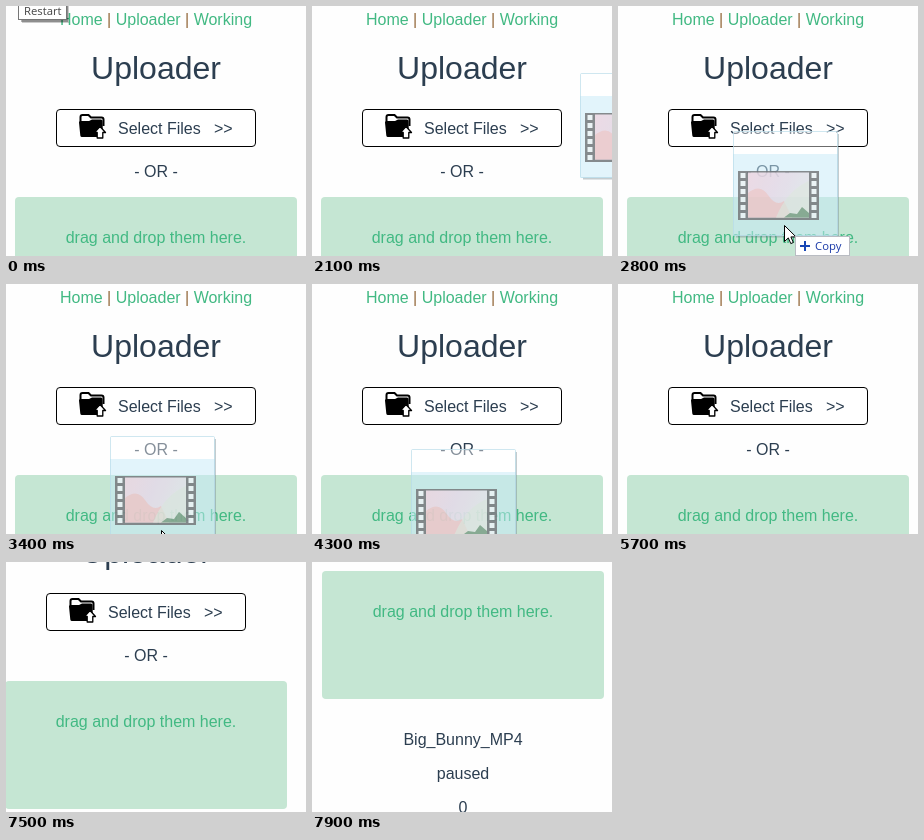
Animation, 300 px wide and 250 px high, one loop 8000 ms. Source, as an HTML page:

```html
<!DOCTYPE html>
<html lang="en">
<head>
<meta charset="utf-8">
<title>Uploader</title>
<style>
  html, body { margin: 0; width: 100%; height: 100%; overflow: hidden; background: #fefefe; }
  svg { display: block; width: 300px; height: 250px; }
  text { font: 16px "Liberation Sans", Arial, sans-serif; fill: #2c3e50; }
  .mid { text-anchor: middle; }
  .green { fill: #42b983; }
  .bar { fill: #94693c; }
  .title { font-size: 32px; }
  .small { font: 11.3px "Open Sans", "Noto Sans", sans-serif; }
</style>
</head>
<body>
<svg viewBox="0 0 300 250">
  <defs>
    <linearGradient id="sky" x1="0" y1="0" x2="1" y2="0.3">
      <stop offset="0" stop-color="#eed6e0"/>
      <stop offset="0.5" stop-color="#e6d9e6"/>
      <stop offset="1" stop-color="#e2e4e8"/>
    </linearGradient>
    <pattern id="holes" width="10" height="8" patternUnits="userSpaceOnUse">
      <rect width="10" height="8" fill="#747679"/>
      <rect x="2.5" y="2" width="5" height="5" fill="#edf3f5"/>
    </pattern>
    <rect id="strip" width="10" height="48" fill="url(#holes)"/>
  </defs>

  <g id="page">
    <text class="mid" x="150" y="19"><tspan class="green">Home</tspan><tspan class="bar"> | </tspan><tspan class="green">Uploader</tspan><tspan class="bar"> | </tspan><tspan class="green">Working</tspan></text>
    <text class="mid title" x="150" y="73">Uploader</text>

    <rect x="50.5" y="103.5" width="199" height="37" rx="3.5" fill="#fff" stroke="#000"/>
    <path d="M74.5 117V111Q74.5 109 76.500 109H82.500L85 111.500H95.500Q97.500 111.500 97.500 113.500V120" fill="#fff" stroke="#000" stroke-width="2"/>
    <path d="M73 116.500Q73 115 74.500 115H83L86 113.500H95Q96.500 113.500 96.500 115L97 131H76Q74.500 131 74.300 129.500Z"/>
    <path d="M94 120.500L99.500 126.500H96.800V132H91.200V126.500H88.500Z" fill="#fff" stroke="#000" stroke-width="1.3" stroke-linejoin="round"/>
    <text x="112" y="128">Select Files</text>
    <text x="208" y="128">&gt;&gt;</text>

    <text class="mid" x="150" y="171">- OR -</text>
    <rect x="9" y="191" width="282" height="128" rx="4" fill="#c5e6d3"/>
    <text class="mid green" x="150" y="237">drag and drop them here.</text>

    <text class="mid" x="150" y="365">Big_Bunny_MP4</text>
    <text class="mid" x="150" y="399">paused</text>
    <text class="mid" x="150" y="433">0</text>
  </g>

  <g id="tip">
    <rect x="16" y="0" width="47" height="17" opacity=".2"/>
    <rect x="15" y="0" width="47" height="16" opacity=".3"/>
    <rect x="12.5" y="-5.5" width="48" height="19" fill="#fff" stroke="#767676"/>
    <text class="small" x="18" y="9" style="fill:#444">Restart</text>
  </g>

  <g id="ghost">
    <path d="M105 3V105.500H3" fill="none" stroke="#6d7f88" stroke-width="2" opacity=".4"/>
    <rect width="105" height="23" fill="#fff" opacity=".42"/>
    <rect y="23" width="105" height="82" fill="#c8ebfa" opacity=".5"/>
    <rect x=".5" y=".5" width="104" height="104" rx="1" fill="none" stroke="#b5dbe8" opacity=".65"/>
    <g transform="translate(5 40)" opacity=".84">
      <rect width="81" height="49" fill="#747679"/>
      <use href="#strip"/>
      <use href="#strip" x="71"/>
      <rect x="10" y="1.5" width="61" height="45" fill="url(#sky)"/>
      <path d="M10 46.500V22Q22 12 30 24T46 30L54 46.500Z" fill="#edc6c8"/>
      <path d="M38 46.500Q50 18 71 10V46.500Z" fill="#dfe6dc" opacity=".7"/>
      <path d="M46 46.500L52 42 59 43 64 36 71 42V46.500Z" fill="#7b9f84"/>
    </g>
  </g>

  <path id="pointer" d="M.5 .5V16.500L4.300 12.900 6.800 18.600 9.300 17.500 6.900 11.900H12Z" fill="#fff" stroke="#000"/>
  <g id="copy">
    <rect x="11.5" y="11.5" width="54" height="19" fill="#fff" stroke="#b9bcc2"/>
    <path d="M16 21H26M21 16V26" stroke="#1747b5" stroke-width="2"/>
    <text class="small" x="31" y="25" style="fill:#1a3aa8">Copy</text>
  </g>
</svg>
<script>
  const LOOP = 8000;
  const STEP = 100;      // the screen is sampled ten times a second
  const ZONE_TOP = 191;
  const GRIP = [51, 94]; // pointer tip inside the dragged card

  // A stop is [arrival time, x, y, glide time]; the part rests between glides.
  const drag = {
    end: 5700,
    stops: [
      [2100, 268, 67], [2500, 50, 136, 400], [2800, 115, 125, 300], [2900, 120, 59, 100],
      [3400, 104, 152, 500], [3700, 77, 57, 100], [3800, 104, 150, 100],
      [4100, 105, 61, 200], [4300, 99, 165, 100], [4800, 99, 72, 100], [5000, 99, 170, 200]
    ]
  };
  const sweeps = [
    { end: 600, stops: [[400, 70, 22], [500, 181, 108, 100]] },
    { end: 6800, stops: [[6500, 161, 147], [6700, 91, 7, 200]] }
  ];
  const scroll = {
    end: LOOP,
    stops: [[0, 0, 0], [7500, -10, -72, 100], [7900, 1, -182, 400]]
  };

  const el = id => document.getElementById(id);
  const [page, tip, ghost, pointer, copy] = ["page", "tip", "ghost", "pointer", "copy"].map(el);
  const smooth = u => u * u * (3 - 2 * u);

  function at({ end, stops }, t) {
    if (t < stops[0][0] || t >= end) return null;
    const next = stops.findIndex(s => s[0] > t);
    if (next < 0) return stops.at(-1).slice(1, 3);
    const [, x0, y0] = stops[next - 1];
    const [time, x1, y1, glide] = stops[next];
    const k = smooth(Math.max(0, 1 - (time - t) / glide));
    return [x0 + (x1 - x0) * k, y0 + (y1 - y0) * k].map(Math.round);
  }

  function place(node, pos) {
    node.style.display = pos ? "" : "none";
    if (pos) node.setAttribute("transform", `translate(${pos})`);
  }

  function draw(t) {
    const card = at(drag, t);
    const hand = card
      ? card.map((v, i) => v + GRIP[i])
      : sweeps.map(s => at(s, t)).find(Boolean);
    place(page, at(scroll, t));
    place(tip, t < 400 ? [0, 0] : null);
    place(ghost, card);
    place(pointer, hand);
    place(copy, card && hand[1] > ZONE_TOP ? hand : null);
  }

  const start = performance.now();
  function tick() {
    const t = (performance.now() - start) % LOOP;
    draw(Math.floor(t / STEP) * STEP);
    requestAnimationFrame(tick);
  }
  tick();
</script>
</body>
</html>
```
